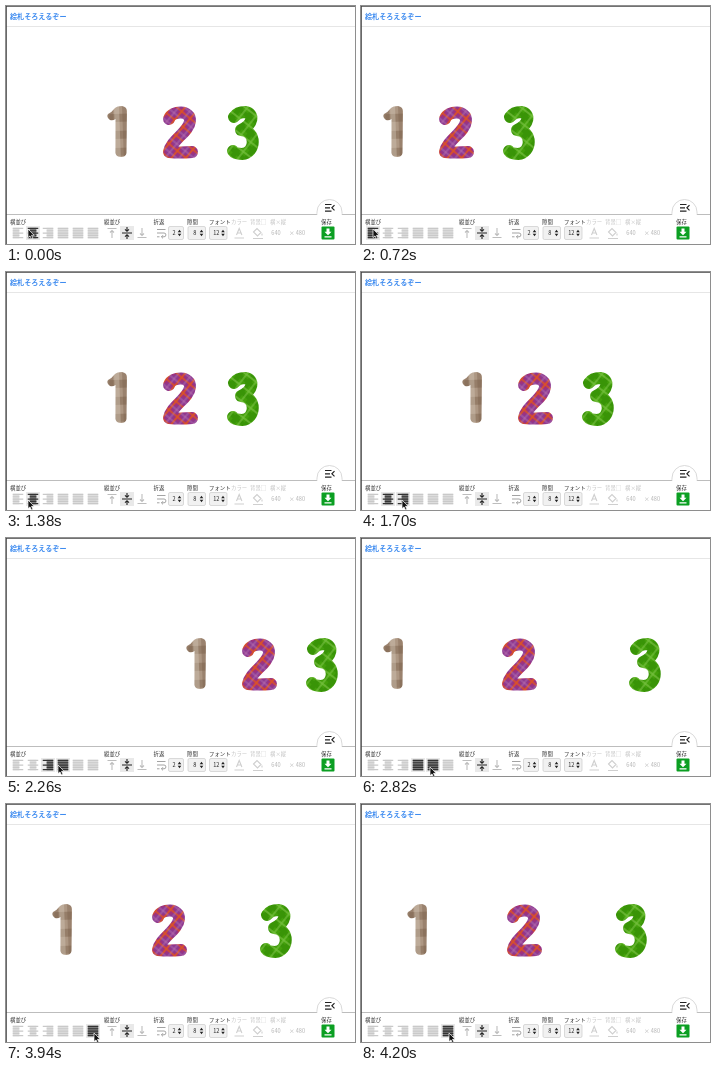
These frames come from a looping animation (349x238 px, 4360 ms). An HTML page:

```html
<!DOCTYPE html>
<html lang="ja">
<head>
<meta charset="utf-8">
<style>
html, body { margin: 0; width: 100%; height: 100%; overflow: hidden; background: #fff; }
svg { display: block; width: 349px; height: 238px; }
text { font-family: "Noto Sans CJK JP", "Noto Sans CJK", "Noto Sans", sans-serif; }
.label { font-size: 5.4px; fill: #333; }
.faint { fill: #c4c4c4; }
.value { font-size: 5.6px; fill: #222; text-anchor: middle; }
.value.faint { fill: #b4b4b4; }
</style>
</head>
<body>
<svg viewBox="0 0 349 238" xmlns="http://www.w3.org/2000/svg">
  <defs>
    <pattern id="brown" width="13" height="17" patternUnits="userSpaceOnUse" patternTransform="translate(108 100) rotate(-2)">
      <path fill="#ad9783" d="M0 0h13v17H0z"/>
      <path fill="#806650" opacity=".5" d="M0 8h13v8H0z"/>
      <path fill="#d5c8b8" opacity=".4" d="M0 0h5v17H0z"/>
      <path fill="#745b47" opacity=".35" d="M8 0h4v17H8z"/>
    </pattern>
    <pattern id="purple" width="11" height="11" patternUnits="userSpaceOnUse" patternTransform="translate(160 104) rotate(40)">
      <path fill="#a0317d" d="M0 0h11v11H0z"/>
      <path fill="#7d3fa0" opacity=".6" d="M6 0h4v11H6zM0 6h11v4H0z"/>
      <path stroke="#dc5324" stroke-width="1.7" d="M2 0v11M0 2h11"/>
      <path stroke="#c983b9" stroke-width=".6" d="M8 0v11M0 8h11"/>
    </pattern>
    <pattern id="green" width="12" height="12" patternUnits="userSpaceOnUse" patternTransform="translate(224 101) rotate(38)">
      <path fill="#43a00b" d="M0 0h12v12H0z"/>
      <path fill="#328c05" opacity=".6" d="M6 0h5v12H6zM0 6h12v4H0z"/>
      <path stroke="#83c84c" stroke-width="1.3" opacity=".75" d="M2 0v12M0 3h12"/>
    </pattern>
  </defs>

  <path fill="#fff" d="M0 0h349v238H0z"/>
  <path fill="#e6e6e6" d="M0 20h349v1H0z"/>
  <text x="4" y="13.3" font-size="7.1" font-weight="700" fill="#3f8cf0">絵札そろえるぞー</text>

  <g id="digits" fill="none" stroke-width="12" stroke-linecap="round" stroke-linejoin="round">
    <path fill="url(#brown)" d="M102 108Q106 106 109 102Q111 100 116 100Q121 101 121 105L120.500 147Q120 151 115 151Q110 151 109.500 147L109.500 113Q107 115 104 114Q100 111 102 108Z"/>
    <path stroke="url(#purple)" d="M163 113C166 104 185 104 184 115C183 126 165 134 163 146Q174 147 186 146"/>
    <path stroke="url(#green)" d="M228 111C231 107 236 106 239 106C249 107 247 119 235 124C251 125 250 147 236 148Q229 148 227 145"/>
  </g>

  <path fill="#bdbdbd" d="M0 208h349v1H0z"/>
  <path fill="#fff" stroke="#d0d0d0" stroke-width=".8" d="M311 208.500V206a12.500 12.500 0 0 1 25 0V208.500"/>
  <path fill="#fff" d="M311.400 207.500h24.200v2h-24.200z"/>
  <path fill="none" stroke="#222" stroke-width="1.2" d="M319 198.500h6.500M319 201.800h5M319 205.100h6.500M328.500 199.200l-2.600 2.600l2.600 2.600"/>

  <g id="labels"></g>
  <g id="align"></g>

  <path fill="#e9e9e9" d="M114 220h14v14h-14z"/>
  <g fill="none" stroke="#bdbdbd" stroke-width="1.100">
    <path d="M101.500 222.500h9M106 232v-7.500M104 226.500l2-2l2 2"/>
    <path d="M131.500 231.500h9M136 222v7.500M134 227.500l2 2l2-2"/>
    <path stroke="#222" d="M116 227h10M121 221v4.300M119 223.300l2 2l2-2M121 233v-4.300M119 230.700l2-2l2 2"/>
    <path stroke="#999" stroke-width=".9" d="M151 223.500h8.500M151 227h7a1.900 1.900 0 0 1 0 3.800h-2.500M157 229.200l-1.600 1.600l1.600 1.600M151 230.800h2.500"/>
    <path stroke="#cfcfcf" d="M230.500 229l2.700-6.500l2.700 6.500M231.500 227h3.400M228.500 232h9.500"/>
    <path stroke="#cfcfcf" d="M247.500 226l3.500-3.500l4 4l-3.500 3.500zM256 227.500v2M247 232.500h10"/>
  </g>
  <g id="selects"></g>
  <text class="value faint" x="270" y="229.200">640</text>
  <text class="value faint" x="291" y="229.200">× 480</text>
  <rect x="315.500" y="220.500" width="13" height="13" rx="1" fill="#0b9f22"/>
  <path fill="#fff" d="M320.500 222.500h3v3.300h2l-3.500 3.500l-3.500-3.500h2zM318.500 230.300h7v1.200h-7z"/>

  <path fill="#444" d="M0 0h349v.8H.8V238H0z"/>
  <path id="cursor" fill="#111" stroke="#fff" stroke-width=".7" d="M0 0v8.600l2-1.700l1.500 3.100l1.500-.7l-1.500-3h2.700z"/>
</svg>
<script>
const LOOP = 4360;
const byId = id => document.getElementById(id);
const add = (parent, markup) => parent.insertAdjacentHTML("beforeend", markup);

const labels = [
  [4, "横並び"], [98, "縦並び"], [147.5, "折返"], [181, "隙間"], [203, "フォント"],
  [225, "カラー", 1], [244, "背景□", 1], [264, "横×縦", 1], [315, "保存"]
];
for (const [x, text, faint] of labels)
  add(byId("labels"), `<text class="label ${faint ? "faint" : ""}" x="${x}" y="217.7">${text}</text>`);

for (const [x, width, value] of [[162.5, 15, 2], [182, 17.5, 8], [203.5, 17.5, 12]]) {
  const arrow = x + width - 4;
  add(byId("selects"), `<rect x="${x}" y="220.5" width="${width}" height="13" rx="1.5" fill="#f1f1f1" stroke="#ccc" stroke-width=".7"/>
    <text class="value" x="${x + width / 2 - 2}" y="229.2">${value}</text>
    <path fill="#222" d="M${arrow - 1.8} 226.300l1.800-2.500l1.800 2.500zM${arrow - 1.8} 227.700l1.800 2.500l1.800-2.500z"/>`);
}

// Text-alignment icons: full and short lines alternate.
const shortLines = [[0, 6.6], [2, 6.6], [3.9, 6.6], [0, 10.5], [0, 10.5], [0, 10.5]];
shortLines.forEach(([inset, width], i) => {
  const left = 6.75 + i * 15;
  let lines = "";
  for (let row = 0; row < 5; row++) {
    const [dx, w] = row % 2 ? [inset, width] : [0, 10.5];
    lines += `M${left + dx} ${221.8 + row * 2.33}h${w}v1.2h${-w}z`;
  }
  add(byId("align"), `<g><rect x="${5 + i * 15}" y="220" width="14" height="14" fill="#e9e9e9"/>
    <g><rect x="${left + inset}" y="221.8" width="${width}" height="10.5" opacity=".6"/><path d="${lines}"/></g></g>`);
});

// Click times, chosen button, and left edge of each digit.
const homes = [101, 157, 221];
const layouts = [
  [0, 1, homes],
  [700, 0, [22, 78, 142]],
  [1380, 1, homes],
  [1940, 2, [180, 236, 300]],
  [2500, 3, [22, 141, 268]],
  [3220, 4, [36, 144, 261]],
  [3940, 5, [46, 146, 254]]
];

// Pointer moves: start, end, x, y.
const moves = [
  [0, 0, 22, 223], [100, 260, 12, 223], [780, 860, 23, 228], [1100, 1140, 22, 228],
  [1560, 1700, 41, 228], [2200, 2260, 52, 227], [2680, 2820, 69, 229], [3480, 3640, 88, 229]
];

function pointerAt(t) {
  let x = 0, y = 0;
  for (const [start, end, toX, toY] of moves) {
    if (t < start) break;
    const p = t >= end ? 1 : (t - start) / (end - start);
    x += (toX - x) * p;
    y += (toY - y) * p;
  }
  return [x, y];
}

const digits = [...byId("digits").children];
const buttons = [...byId("align").children];

function render(time) {
  const t = Math.floor(time % LOOP / 20) * 20;
  const [, active, lefts] = layouts.filter(([start]) => t >= start).pop();
  const [x, y] = pointerAt(t);
  const hover = Math.floor((x - 4.5) / 15);
  digits.forEach((digit, i) => digit.setAttribute("transform", `translate(${lefts[i] - homes[i]} 0)`));
  buttons.forEach((button, i) => {
    const lit = i === active || i === hover;
    button.firstElementChild.setAttribute("opacity", lit ? 1 : 0);
    button.lastElementChild.setAttribute("fill", lit ? "#333" : "#c9c9c9");
  });
  byId("cursor").setAttribute("transform", `translate(${x} ${y})`);
}

const origin = performance.now();
function tick() {
  render(performance.now() - origin);
  requestAnimationFrame(tick);
}
tick();
</script>
</body>
</html>
```
